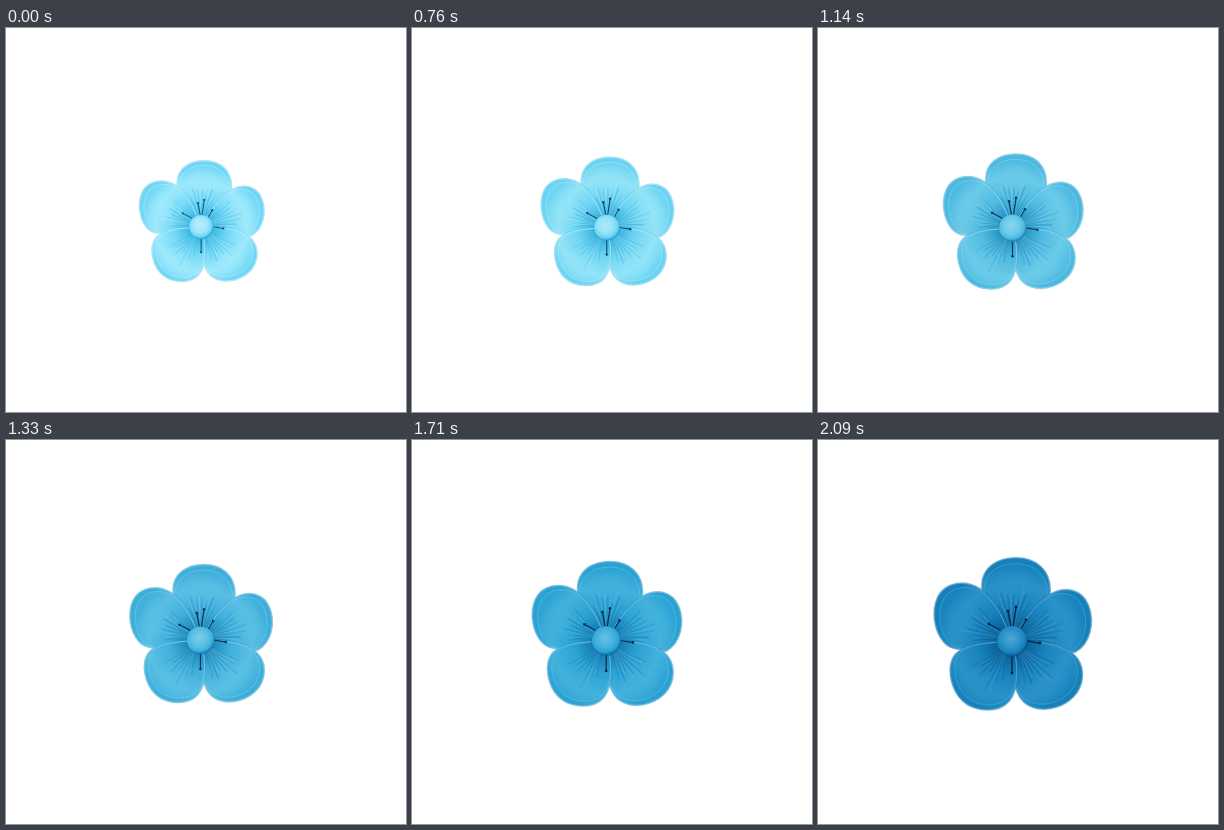
Write an HTML page that moves like this. It is 400 by 384 pixels and loops after 2280 ms.

```html
<!DOCTYPE html>
<html lang="en">
<head>
<meta charset="utf-8">
<title>Growing flower</title>
<style>
html, body { margin: 0; width: 100%; height: 100%; overflow: hidden; background: #fff; }
svg { display: block; width: 100vw; height: 100vh; }
.deep { stop-color: var(--deep); }
.base { stop-color: var(--base); }
.light { stop-color: var(--light); }
.rim { stop-color: var(--rim); }
.shade { fill: none; stroke: var(--deep); stroke-width: 2.2; opacity: .4; }
.body { fill: url(#petal); stroke: var(--rim); stroke-width: .8; }
.inner { fill: var(--light); fill-opacity: .12; stroke: var(--rim); stroke-width: .9; stroke-opacity: .75; }
.glow { fill: var(--light); opacity: .6; filter: url(#soft); }
.fold { fill: none; stroke-linecap: round; }
.dark { stroke: var(--deep); }
.pale { stroke: var(--rim); }
.stamen { stroke: var(--ink); fill: none; stroke-width: 1.3; stroke-linecap: round; }
.tip { fill: var(--ink); }
</style>
</head>
<body>
<svg viewBox="0 0 400 384">
  <defs>
    <radialGradient id="petal" gradientUnits="userSpaceOnUse" cx="194" cy="201" r="87">
      <stop class="deep" offset=".14"/>
      <stop class="base" offset=".4"/>
      <stop class="light" offset=".66"/>
      <stop class="base" offset=".86"/>
      <stop class="base" offset="1"/>
    </radialGradient>
    <radialGradient id="ball" cx=".46" cy=".42" r=".58">
      <stop class="rim" offset="0"/>
      <stop class="light" offset=".55"/>
      <stop class="base" offset=".85"/>
      <stop class="deep" offset="1.0"/>
    </radialGradient>
    <filter id="soft" x="-50%" y="-50%" width="200%" height="200%"><feGaussianBlur stdDeviation="4"/></filter>
  </defs>
  <g id="flower"></g>
</svg>
<script>
const STEP = 190, STEPS = 12;
const HUB = { x: 194, y: 201 };
const widths = [127, 129, 131, 133, 135, 138.5, 142, 145, 149, 152, 157, 160];

// Outline and direction of each petal, back to front
const petals = [
  { angle: -88, d: 'M194 201C184 186 164 166 164 146C164 127 180 118 198 118C218 118 232 130 232 150C232 168 212 184 194 201Z' },
  { angle: 203, d: 'M194 201C186 180 178 161 162 149C146 139 127 143 120 157C113 172 117 192 126 202C136 214 154 209 194 201Z' },
  { angle: -19, d: 'M194 201C205 182 217 163 233 154C248 146 264 150 270 165C277 182 272 204 257 212C244 212 218 204 194 201Z' },
  { angle: 50, d: 'M194 201C218 201 241 203 254 213C268 224 267 245 255 257C243 269 220 274 206 262C194 251 194 225 194 201Z' },
  { angle: 126, d: 'M194 201C171 203 147 203 137 215C128 227 133 250 145 261C157 272 181 273 191 261C202 248 200 221 194 201Z' }
];

const stamens = [
  [193, 187, 190, 171], [195, 187, 198, 167], [182, 190, 171, 184],
  [203, 188, 208, 180], [209, 201, 222, 203], [194, 215, 194, 233]
];

// Colour keys: step, base, light, deep
const tones = [
  [0, [112, 214, 245], [158, 232, 251], [38, 172, 220]],
  [4, [106, 211, 241], [146, 227, 247], [36, 166, 214]],
  [6, [76, 184, 224], [106, 202, 232], [24, 134, 184]],
  [8, [45, 164, 214], [72, 180, 222], [12, 114, 168]],
  [10, [38, 158, 208], [62, 174, 218], [10, 108, 162]],
  [11, [22, 128, 186], [42, 146, 200], [6, 86, 138]]
];

const flower = document.getElementById('flower');
const mix = (a, b, t) => a.map((v, i) => v + (b[i] - v) * t);
const rgb = c => `rgb(${c.map(Math.round).join()})`;
const noise = n => { const v = Math.sin(n * 127.1) * 43758.5; return v - Math.floor(v); };

function polar(angle, r) {
  const a = angle * Math.PI / 180;
  return [HUB.x + r * Math.cos(a), HUB.y + r * Math.sin(a)].map(v => v.toFixed(1));
}

function fold(angle, i, seed) {
  const off = (i - 6) * 3.7;
  const reach = 38 + 20 * noise(seed) - Math.abs(off) * .3;
  const kind = i % 2 ? 'pale' : 'dark';
  return `<path class="fold ${kind}" opacity="${(.14 + .22 * noise(seed + 9)).toFixed(2)}"
    stroke-width="${(1 + noise(seed + 4)).toFixed(1)}"
    d="M${polar(angle + off * .7, 14)}Q${polar(angle + off * .75, 28)} ${polar(angle + off, reach)}"/>`;
}

function petal({ angle, d }, n) {
  const [x, y] = polar(angle, 56);
  const folds = Array.from({ length: 13 }, (_, i) => fold(angle, i, n * 20 + i + 1)).join('');
  return `<path class="shade" d="${d}"/><path class="body" d="${d}"/>
    <ellipse class="glow" cx="${x}" cy="${y}" rx="12" ry="19" transform="rotate(${angle} ${x} ${y})"/>
    <path class="inner" d="${d}" transform="translate(${HUB.x} ${HUB.y}) scale(.93) translate(${-HUB.x} ${-HUB.y})"/>
    ${folds}`;
}

flower.innerHTML = petals.map(petal).join('') +
  stamens.map(([x1, y1, x2, y2]) =>
    `<path class="stamen" d="M${x1} ${y1}L${x2} ${y2}"/><circle class="tip" cx="${x2}" cy="${y2}" r="1.4"/>`).join('') +
  `<circle class="shade" cx="194" cy="201.6" r="15"/><circle cx="194" cy="201" r="15" fill="url(#ball)"/>`;

function toneAt(step) {
  const i = Math.max(1, tones.findIndex(k => k[0] >= step));
  const a = tones[i - 1], b = tones[i];
  const t = (step - a[0]) / (b[0] - a[0]);
  return [1, 2, 3].map(c => mix(a[c], b[c], t));
}

function draw(step) {
  const p = step / (STEPS - 1), s = widths[step] / 160;
  flower.setAttribute('transform',
    `translate(${195.9 - .9 * p} ${193.3 + .7 * p}) scale(${s}) translate(-195 -194)`);
  const [base, light, deep] = toneAt(step);
  const colors = {
    base, light, deep,
    rim: mix(light, [255, 255, 255], .28 - .1 * p),
    ink: mix(deep, [0, 25, 60], .6 + .2 * p)
  };
  for (const name in colors) flower.ownerSVGElement.style.setProperty('--' + name, rgb(colors[name]));
}

const start = performance.now();
let shown = -1;
function tick(now) {
  const step = Math.floor(Math.max(0, now - start) / STEP) % STEPS;
  if (step !== shown) draw(shown = step);
  requestAnimationFrame(tick);
}
tick(start);
</script>
</body>
</html>
```
